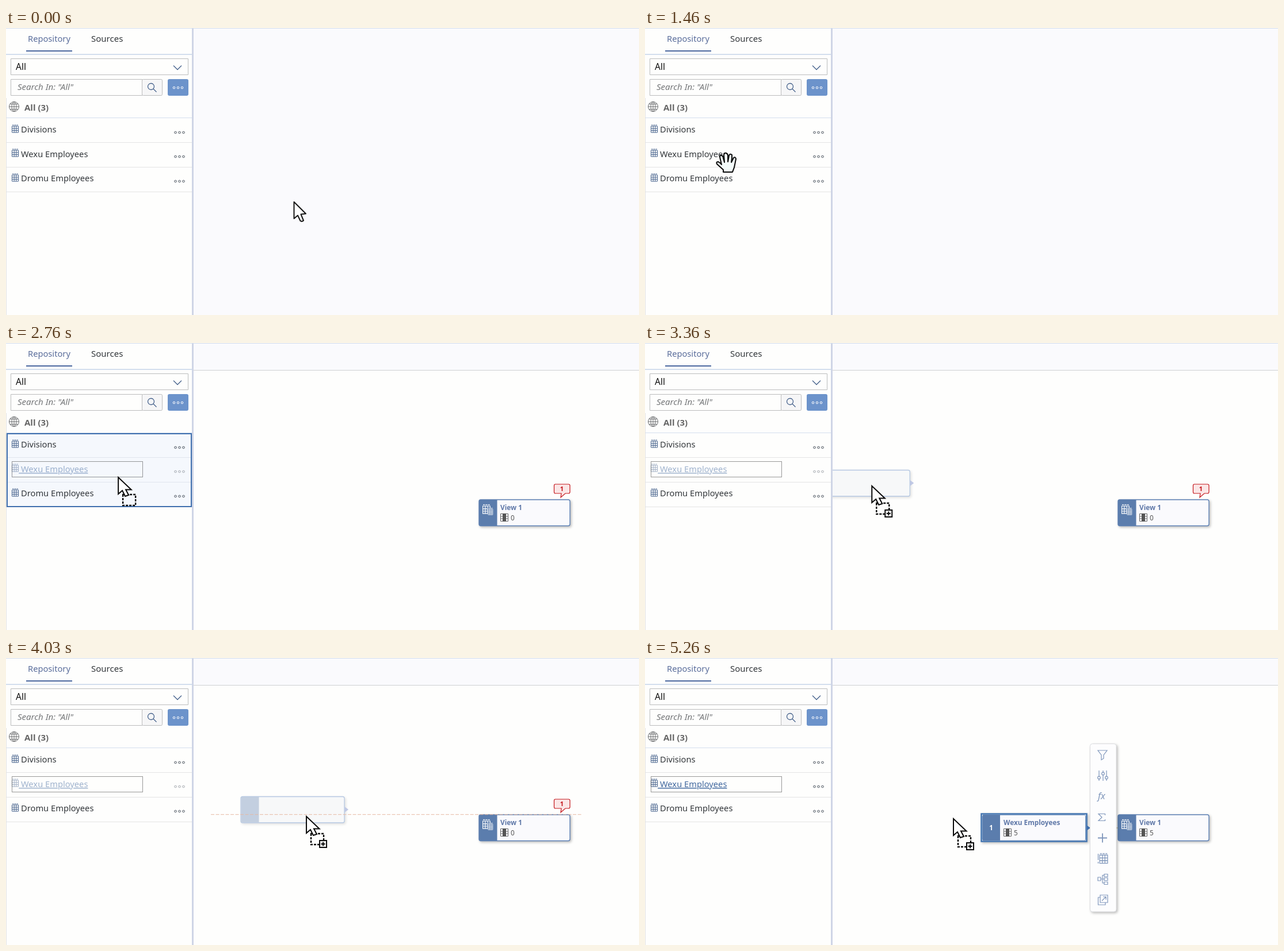
An HTML page that plays this animation: 1100x500 px, repeating every 7200 ms.

```html
<!DOCTYPE html>
<html lang="en">
<head>
<meta charset="utf-8">
<title>Drag a table onto the canvas</title>
<style>
  html, body { margin: 0; width: 100%; height: 100%; overflow: hidden; background: #fefefd; }
  svg { display: block; width: 100%; height: 100%; font: 14.7px "Noto Sans", sans-serif; fill: #32363a; }
  .bold { font-weight: 700; }
  .line { fill: none; stroke-width: 1; }
  .node-title { font-weight: 700; font-size: 11.8px; fill: #5f78a8; }
  .count { font-size: 11.8px; fill: #555; }
  .link { fill: #41689f; text-decoration: underline; }
  .raised { filter: drop-shadow(2px 2px 2px #0004); }
  .tool { fill: none; stroke: #7f96bb; stroke-width: 1.2; }
</style>
</head>
<body>
<svg viewBox="0 0 1100 500">
  <defs>
    <g id="dots" class="line">
      <circle cx="-7" r="1.8"/><circle r="1.8"/><circle cx="7" r="1.8"/>
    </g>
    <path id="table" class="line" d="M.5 2.5H11.5V13.5H.5ZM.5 6.5H11.5M.5 10H11.5M4.2 2V13.5M7.8 2V13.5M1 .5H3.5M4.5 .5H7.5M8.5 .5H11"/>
    <g id="columns">
      <path class="line" stroke="#666" d="M.5 .5H13.5V13.5H.5ZM.5 5H13.5M.5 9H13.5"/>
      <path fill="#555" d="M4 0H10V14H4Z"/>
    </g>
    <g id="arrow" stroke="#161616" stroke-width="2" fill="#fefefe" stroke-linejoin="round">
      <path d="M.5 1V30L7 24.5L11.5 34Q14 36 17 33.5L12.5 22.5L21 21.5Z"/>
    </g>
    <g id="hand">
      <path fill="#f3fbfa" stroke="#0c0c0c" stroke-width="2" stroke-linejoin="round"
        d="M13 34V30L2 20Q0 16 4 16Q7 17 10 21L7 8Q7 4 10 5Q13 6 13 10L15 17L14 4Q15 0 18 1Q21 2 21 6V16L23 5Q25 1 28 4V9L27 17L31 9Q34 7 35 11L32 26L29 34Z"/>
    </g>
    <g id="dragCursor">
      <path fill="none" stroke="#0a0a0a" stroke-width="2.4" stroke-dasharray="4 2" d="M9 32H31V51H9Z"/>
      <path fill="#fefefe" stroke="#0a0a0a" stroke-width="2" d="M1 2V31L8 25L13 35L19 33L14 23.5H23.5Z"/>
    </g>
    <clipPath id="canvasClip"><path d="M326 48H1100V500H326Z"/></clipPath>
  </defs>

  <rect x="326" width="774" height="500" fill="#fafafd"/>
  <g id="editor">
    <rect x="326" y="48" width="774" height="452" fill="#fefefd"/>
    <path class="line" stroke="#cfd0d2" d="M326 47.5H1100"/>
  </g>

  <!-- Repository panel -->
  <rect width="323" height="500" fill="#fefefd"/>
  <path class="line" stroke="#d3deee" d="M0 .5H1100M0 156.5H323"/>
  <path class="line" stroke="#e4e4e4" d="M.5 122V500M0 199.5H323M0 242.5H323M0 285.5H323"/>
  <path fill="#d3deee" d="M0 45H323V47H0Z"/>
  <path fill="#cfd5e6" d="M323 1H326V500H323Z"/>
  <path fill="#4a679f" d="M35 39H115V41H35Z"/>
  <text x="38" y="24" fill="#5a6d9b">Repository</text>
  <text x="148" y="24" font-size="15">Sources</text>
  <g class="line" stroke="#bbbcbd">
    <path d="M8.5 53.5H316.5V81.5H8.5ZM8.5 89.5H236.5V117.5H8.5Z"/>
    <rect x="236.5" y="89.5" width="35" height="28" rx="2" fill="#f6f6f7"/>
  </g>
  <text x="17" y="73" font-size="15.5" fill="#111">All</text>
  <text x="20" y="108" font-size="15" font-style="italic" fill="#747678">Search In: "All"</text>
  <g fill="none" stroke="#46628c" stroke-width="1.3">
    <path d="M291 65.5L298 72.5L305 65.5"/>
    <circle cx="252" cy="102" r="5.5"/><path d="M256 106L261.5 111.5"/>
  </g>
  <rect x="281" y="89" width="36" height="29" rx="3" fill="#6c93cb"/>
  <use href="#dots" x="299" y="104" stroke="#fff"/>
  <g class="line" stroke="#6c6e70">
    <circle cx="14" cy="137" r="8.5"/><ellipse cx="14" cy="137" rx="4" ry="8.5"/>
    <path d="M5.5 137H22.5M14 128.5V145.5M7 132.5H21M7 141.5H21"/>
  </g>
  <text x="32" y="144" class="bold" font-size="15" fill="#666">All (3)</text>

  <g id="dropZone">
    <rect x="2" y="158" width="320" height="127" fill="#f5f8fd" stroke="#3f6fae" stroke-width="2"/>
    <path class="line" stroke="#e0e5ee" d="M3 199.5H321M3 242.5H321"/>
  </g>
  <g id="rows"></g>
  <path id="focusRing" class="line" stroke="#333" stroke-dasharray="1 1" d="M10.5 206.5H237.5V233.5H10.5Z"/>

  <!-- Canvas nodes -->
  <g id="view">
    <g class="raised">
      <rect x="822" y="273" width="158" height="45.5" rx="3" fill="#fafafd" stroke="#5b7fb3" stroke-width="1.4"/>
    </g>
    <path fill="#5b7dad" d="M825 273H853.5V318H825Q822 318 822 315V276Q822 273 825 273Z"/>
    <g stroke="#fff">
      <use href="#table" transform="translate(828 281) scale(1.15 1.2)"/>
      <rect x="837" y="287" width="10" height="13" fill="#5b7dad" stroke="none"/>
      <use href="#table" transform="translate(837.5 287) scale(.72 .9)"/>
    </g>
    <text x="859" y="291" class="node-title">View 1</text>
    <use href="#columns" x="859" y="297"/>
    <text id="viewCount" x="877" y="309" class="count">0</text>
  </g>
  <g id="badge">
    <path fill="#fbe6e6" stroke="#c4161c" stroke-width="1.2" d="M954.5 246H977.5Q980 246 980 248.5V259.5Q980 262 977.5 262H972L964 269L965 262H954.5Q952.5 262 952.5 259.5V248.5Q952.5 246 954.5 246Z"/>
    <text x="966" y="258" text-anchor="middle" class="bold" font-size="11" fill="#c4161c">1</text>
  </g>

  <g clip-path="url(#canvasClip)">
    <g id="ghost">
      <g opacity=".45">
        <g class="raised"><rect x=".5" y=".5" width="180" height="45.5" rx="3" fill="#f0f2f6" stroke="#6088c2" stroke-width="1.3"/></g>
        <path fill="#7d97bd" d="M1 1H32V45.5H1Z"/>
        <path fill="#7689c8" d="M181 18L187.5 23L181 28Z"/>
      </g>
    </g>
  </g>
  <path id="guide" class="line" stroke="#e6b8a2" stroke-width="1.6" stroke-dasharray="6 2.5"/>

  <g id="tableNode">
    <g class="raised"><rect x="584.5" y="271.5" width="183" height="48" fill="#fefefe" stroke="#4274b0" stroke-width="2.5"/></g>
    <rect x="586.5" y="273.5" width="179" height="44.5" rx="2" fill="#fafafd" stroke="#6f90bd"/>
    <path fill="#5b7dad" d="M587 273H617V318H587Z"/>
    <text x="601.5" y="300" text-anchor="middle" class="bold" font-size="11.5" fill="#fff">1</text>
    <text x="623" y="291" class="node-title">Wexu Employees</text>
    <use href="#columns" x="623" y="297"/>
    <text x="641" y="309" class="count">5</text>
    <path fill="#3f6fae" d="M767 291L774 296L767 301Z"/>
    <path class="line" stroke="#9b9a70" d="M774 296H822"/>
  </g>
  <g id="toolbar">
    <g class="raised"><rect x="773.5" y="149.5" width="45.5" height="292.5" rx="4" fill="#fdfdfe" stroke="#dcdde0"/></g>
    <g class="tool">
      <path d="M787 161H803L797 169V175L793 177.500V169Z"/>
      <path d="M789 196V206M789 211V214M796 196V199M796 204V214M802 196V206M802 211V214"/>
      <circle cx="789" cy="208.500" r="2.300"/><circle cx="796" cy="201.500" r="2.300"/><circle cx="802" cy="208.500" r="2.300"/>
      <path d="M799.500 274V271.500H788L794 277.500L788 283.500H799.500V281"/>
      <path stroke-width="1.800" d="M787 313.500H803M795 305.500V321.500"/>
      <use href="#table" transform="translate(789.500 340) scale(1.250 1.300)"/>
      <path d="M787.500 341V352M787.500 355V358M787 382H792V388H787ZM798 376.500H804V381H798ZM798 383H804V387.500H798ZM798 390H804V394.500H798ZM792 385H798M795 385V378.500H798M795 385V392H798"/>
      <path d="M791 413H804V426H791ZM791 417H787.500V430H800V426M794 423L801 416M796 416H801V421"/>
    </g>
    <text x="787" y="246" font-size="16" font-style="italic" fill="#7f96bb">fx</text>
  </g>

  <g id="pointer">
    <use id="pointerArrow" href="#arrow"/>
    <use id="pointerHand" href="#hand" x="-18" y="-18"/>
    <g id="pointerDrag">
      <use href="#dragCursor"/>
      <g id="plus" fill="#fefefe" stroke="#0a0a0a" stroke-width="2">
        <path d="M24 44H36V56H24Z"/><path d="M26.500 50H33.500M30 46.500V53.500"/>
      </g>
    </g>
  </g>
</svg>
<script>
const LOOP = 7200;
const DRAG = 2430, ENTER_CANVAS = 3150, GUIDE = 3800, DROP = 4930, CONNECT = 5060, TOOLBAR = 5190;
const byId = id => document.getElementById(id);
const show = (id, on) => byId(id).style.display = on ? '' : 'none';

const rowData = [['Divisions', 169, 182], ['Wexu Employees', 211, 225], ['Dromu Employees', 254, 267]];
byId('rows').innerHTML = rowData.map(([label, top, base]) => `
  <g><use href="#table" x="10" y="${top - .5}" stroke="#46628c"/>
  <text x="22.200" y="${base}">&nbsp;${label}</text>
  <use href="#dots" x="301.500" y="${top + 13}" stroke="#4c5560"/></g>`).join('');
const [, wexuRow, dromuRow] = byId('rows').children;
const setLink = (row, on) => row.querySelector('text').classList.toggle('link', on);

// Each entry: time, x, y
const pointerPath = [
  [600, 500, 302], [860, 350, 279], [1000, 225, 264], [1150, 150, 258], [1330, 137, 256],
  [1460, 141, 235], [1650, 158, 230], [1830, 162, 229], [2400, 162, 229], [2760, 194, 232],
  [3100, 305, 240], [3360, 393, 247], [3830, 500, 261], [4030, 521, 274], [4560, 535, 278]
];
// Each entry: time, top of the dragged node
const ghostPath = [[3130, 219], [3360, 221], [3830, 228], [4030, 241], [4560, 245]];

// Smooth interpolation that never overshoots its keys
function sample(keys, t, axis = 1) {
  const last = keys.length - 1;
  if (t <= keys[0][0]) return keys[0][axis];
  if (t >= keys[last][0]) return keys[last][axis];
  const slope = i => (keys[i + 1][axis] - keys[i][axis]) / (keys[i + 1][0] - keys[i][0]);
  const tangent = i => {
    if (i === 0 || i === last) return 0;
    const a = slope(i - 1), b = slope(i);
    return a * b <= 0 ? 0 : 2 * a * b / (a + b);
  };
  const i = keys.findIndex(key => key[0] > t) - 1;
  const span = keys[i + 1][0] - keys[i][0], u = (t - keys[i][0]) / span, v = 1 - u;
  return keys[i][axis] * v * v * (1 + 2 * u) + keys[i + 1][axis] * u * u * (3 - 2 * u)
    + span * u * v * (v * tangent(i) - u * tangent(i + 1));
}

function draw(t) {
  const x = sample(pointerPath, t), y = sample(pointerPath, t, 2);
  const dragging = t >= DRAG, dropped = t >= DROP, connected = t >= CONNECT;
  const overCanvas = t >= ENTER_CANVAS;
  const overList = x < 323 && !dragging;

  byId('pointer').setAttribute('transform', `translate(${x} ${y})`);
  show('pointerArrow', !overList && !dragging);
  show('pointerHand', overList);
  show('pointerDrag', dragging);
  show('plus', overCanvas);

  setLink(dromuRow, overList && x < 238 && y > 249 && y < 277);
  setLink(wexuRow, dragging || (overList && y < 234));
  wexuRow.setAttribute('opacity', dragging && !dropped ? .5 : 1);
  show('focusRing', dragging);
  show('dropZone', dragging && !overCanvas);

  for (const id of ['editor', 'view']) show(id, dragging);
  show('badge', dragging && !connected);
  byId('viewCount').textContent = connected ? 5 : 0;

  const left = x - 113.5;
  byId('ghost').setAttribute('transform', `translate(${left} ${sample(ghostPath, t)})`);
  show('ghost', overCanvas && !dropped);
  byId('guide').setAttribute('d', `M${left - 51.5} 272.7H${1002 + (left - 408) / 2}`);
  show('guide', t >= GUIDE && !dropped);
  show('tableNode', connected);
  show('toolbar', t >= TOOLBAR);
}

const start = performance.now();
function tick() {
  draw((performance.now() - start) % LOOP);
  requestAnimationFrame(tick);
}
tick();
</script>
</body>
</html>
```
